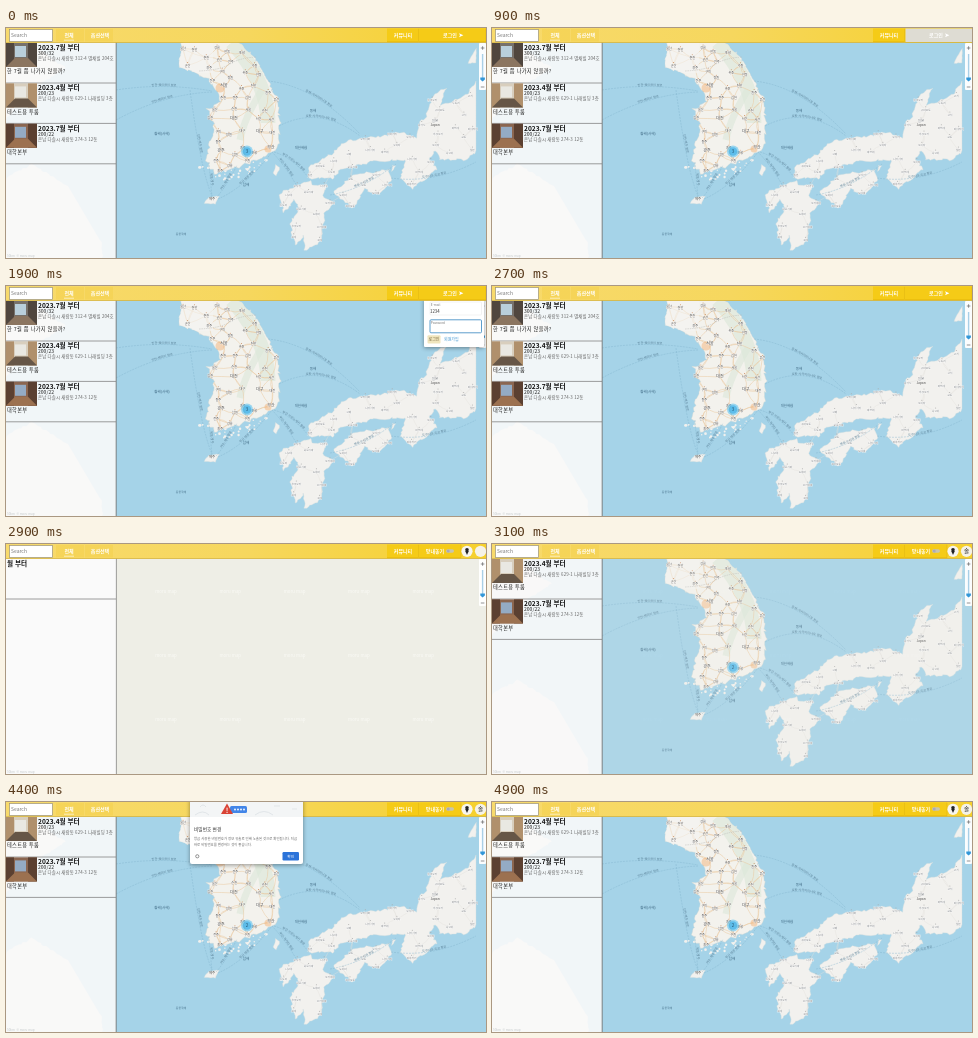
Write an HTML page that moves like this. It is 480x230 px and loops after 5.5 s.

```html
<!DOCTYPE html>
<html lang="ko">
<head>
<meta charset="utf-8">
<title>Room map</title>
<style>
html, body { margin: 0; height: 100%; overflow: hidden; background: #a5d3e8; }
svg { display: block; width: 480px; height: 230px; }
text { font-family: "Noto Sans CJK KR", "Noto Sans CJK", sans-serif; white-space: pre; }
</style>
</head>
<body>
<svg id="stage" viewBox="0 0 480 230"></svg>
<script>
const SEA = '#a5d3e8', LAND = '#f2f1ee';
const clamp = v => Math.max(0, Math.min(1, v));
let seed = 7;
const rand = () => (seed = seed * 16807 % 2147483647) / 2147483647;
const jitter = a => (rand() - .5) * a;

const rect = (x, y, w, h, fill, more = '') =>
  `<rect x="${x}" y="${y}" width="${w}" height="${h}" fill="${fill}" ${more}/>`;
const circle = (x, y, r, fill, more = '') => `<circle cx="${x}" cy="${y}" r="${r}" fill="${fill}" ${more}/>`;
const path = (d, fill, more = '') => `<path d="${d}" fill="${fill}" ${more}/>`;
const line = (d, color, w = 1, more = '') => path(d, 'none', `stroke="${color}" stroke-width="${w}" ${more}`);
const text = (x, y, s, size, fill, more = '') =>
  `<text x="${x}" y="${y}" font-size="${size}" fill="${fill}" ${more}>${s}</text>`;
const mid = (x, y, s, size, fill, more = '') => text(x, y, s, size, fill, 'text-anchor="middle" ' + more);
const group = (id, body) => `<g id="${id}">${body}</g>`;
const BOLD = 'font-weight="700"', SHADOW = 'style="filter:drop-shadow(0 1px 2px #0006)"';

// Turns a few corner points into a rough closed coastline; long straight edges stay straight.
function coast(corners, rough) {
  const p = corners.split(' ').map(q => q.split(',').map(Number));
  const dots = p.flatMap(([x, y], i) => {
    const [u, v] = p[(i + 1) % p.length], edge = Math.hypot(u - x, v - y);
    const n = Math.ceil(edge / 2.5), r = edge > 50 ? 0 : rough;
    return Array.from({ length: n }, (_, k) =>
      `${(x + (u - x) * k / n + jitter(r)).toFixed(1)} ${(y + (v - y) * k / n + jitter(r)).toFixed(1)}`);
  });
  return `M${dots.join('L')}Z`;
}

const korea = coast('176,14 172,38 189,45 202,52 210,62 214,74 201,82 209,98 205,111 201,132 207,145 225,141 236,137 257,130 267,123 274,112 273,76 262,53 249,30 231,14', 3.5);
const honshu = coast('302,150 302,139 327,125 342,112 373,109 395,104 410,109 412,98 420,88 427,67 440,60 435,78 460,67 470,53 470,125 459,132 434,132 430,122 423,131 431,141 407,161 394,150 399,132 369,133 335,142 326,151', 2.5);
const shikoku = coast('327,165 347,147 383,142 385,153 373,167 359,161 347,180 336,172', 2.5);
const kyushu = coast('304,152 291,158 272,166 278,184 289,172 294,180 284,195 289,217 298,207 299,223 314,213 319,185 328,175 317,167 321,157 308,158', 2.5);
const isles = ['198,175 203,169 213,168 209,176', '270,137 274,140 270,148 267,145', '462,35 470,20 470,35', '387,137 390,138 386,143']
  .map(s => coast(s, 1)).join('');
const china = coast('0,14 22,14 45,30 60,40 26,60 0,92', 2) + coast('0,150 26,136 62,158 95,214 97,232 0,232', 2);
let islets = '';
for (let i = 0; i < 34; i++) {
  const a = rand();
  islets += circle(193 + a * 66 + jitter(5), 138 + 13 * Math.sin(a * 3) - a * 8 + jitter(10), .5 + rand(), LAND);
}

// Spreads places over a land shape, at least a gap apart.
const pen = document.createElement('canvas').getContext('2d');
function scatter(shape, gap, [x0, y0, x1, y1], places = []) {
  const land = new Path2D(shape);
  for (let i = 0; i < 900; i++) {
    const x = x0 + rand() * (x1 - x0), y = y0 + rand() * (y1 - y0);
    if (pen.isPointInPath(land, x, y) && places.every(([u, v]) => Math.hypot((x - u) * .8, y - v) > gap)) places.push([x, y]);
  }
  return places;
}
// Joins each place to its nearest neighbours.
const network = (places, links) => places.map(([x, y]) =>
  [...places].sort((a, b) => Math.hypot(a[0] - x, a[1] - y) - Math.hypot(b[0] - x, b[1] - y)).slice(1, links + 1)
    .map(([u, v]) => `M${x} ${y}Q${(x + u) / 2 + jitter(5)} ${(y + v) / 2 + jitter(5)} ${u} ${v}`).join('')).join('');
const labels = (places, names, size, color, dot) => places.map(([x, y], i) =>
  circle(x, y - 3, .5, dot) + mid(x, y + 1, names[i % names.length], size(i), color, 'stroke="#fff" stroke-width=".5" paint-order="stroke"')).join('');

const cities = scatter(korea, 9, [170, 18, 276, 144], [[218, 58], [228, 91], [254, 104], [265, 120], [215, 123]]);
const cityNames = '서울 대전 대구 부산 광주 수원 천안 전주 순천 진주 창원 울산 포항 구미 안동 충주 원주 강릉 춘천 군산 속초 서산 김천 남원'.split(' ');
const towns = scatter(honshu + shikoku + kyushu, 11, [270, 60, 468, 218], [[429, 93]]);
const townNames = '일본 후쿠오카 나가사키 구마모토 오이타 미야자키 히로시마 마쓰에 오카야마 돗토리 고베 교토 오사카 나고야 도야마 나가노 고치'.split(' ');

const ferries = [
  [110, 62, 206, 63, -8, '인천-웨이하이 항로'], [110, 92, 206, 64, -12, '인천-옌타이 항로'],
  [184, 62, 206, 168, 28, '인천-제주 항로'], [203, 134, 206, 168, 4, '목포-제주'],
  [212, 171, 266, 124, 12, '부산-제주 항로'], [210, 170, 231, 137, 5, '여수-제주 항로'],
  [266, 124, 291, 158, -4, '부산-하카타 항로'], [268, 124, 303, 150, -8, '부산-시모노세키 항로'],
  [273, 98, 354, 108, -26, '포항-사카이미나토 항로'], [262, 53, 354, 106, -22, '동해-사카이미나토 항로'],
  [324, 167, 390, 136, 10, '벳푸-오사카 항로'], [385, 150, 470, 134, 14, '도쿠시마-도쿄 항로']
].map(([x, y, u, v, bend, name], i) =>
  `<path id="way${i}" d="M${x} ${y}Q${(x + u) / 2} ${(y + v) / 2 + bend} ${u} ${v}" fill="none" stroke="#7fb0c9" stroke-width=".4" stroke-dasharray="2 1"/>` +
  `<text font-size="3.1" fill="#587f96" text-anchor="middle" dy="-.5"><textPath href="#way${i}" startOffset="50%">${name}</textPath></text>`).join('');

const sea = (x, y, name, size = 3.6) => mid(x, y, name, size, '#47718b');
const mapArt = rect(0, 14, 480, 216, SEA) + path(china, LAND) + islets +
  path(honshu + shikoku + kyushu + isles, LAND, 'stroke="#d5dddd" stroke-width=".4"') +
  path(korea, '#f3f2ed', 'stroke="#d3d9d4" stroke-width=".4"') +
  `<clipPath id="land">${path(korea, '#000')}</clipPath><g clip-path="url(#land)">` +
  line('M226 14Q262 55 262 95', '#dde8da', 15, 'opacity=".65"') + line('M256 62Q238 90 234 112', '#dde8da', 7, 'opacity=".6"') +
  line(network(cities, 3), '#e9c79c', .5) + rect(165, 14, 42, 31, '#f5f5f3', 'opacity=".6"') + '</g>' +
  line('M193 43Q215 42 224 36T250 29', '#b9b9b4', .5, 'stroke-dasharray="1.5 .8"') +
  circle(214, 60, 4.5, '#f3a45f', 'opacity=".4"') + circle(262, 121, 3.5, '#f3a45f', 'opacity=".4"') +
  line(network(towns, 1), '#e2e1dc', .4) + ferries +
  labels(towns, townNames, i => i ? 2.7 : 3.6, '#7b7e80', '#aaa') +
  labels(cities, cityNames, i => i < 5 ? 4 : 3.1, '#45423e', '#c98a5c') + mid(429, 98, 'Japan', 3.2, '#444') +
  mid(206, 172, '제주', 3.4, '#555') + sea(156, 107, '황해(서해)') + sea(307, 84, '동해') +
  sea(295, 121, '대한해협', 3.4) + sea(240, 158, '남해') + sea(175, 207, '동중국해', 2.8) +
  circle(241, 123.5, 6, '#52bdef', 'opacity=".55"') + circle(241, 123.5, 4.3, '#3eb1ea', 'opacity=".65"') +
  mid(241, 125.2, '3', 4.5, '#245776', 'id="count"');

let blank = rect(0, 14, 480, 216, '#eeeee6');
for (let y = 47; y < 230; y += 64.3)
  for (let x = 160; x < 440; x += 64.3) blank += mid(x, y + 1.5, 'moru map', 4.4, '#fafaf6');

const photo = (y, [wall, side, light, floor]) => rect(0, y, 31, 24, wall) + rect(0, y, 8, 24, side) + rect(22, y, 9, 24, side) +
  rect(9, y + 3, 11, 11, light) + path(`M0 ${y + 24}L9 ${y + 15}H22L31 ${y + 24}Z`, floor);
const rooms = [
  ['2023.7월 부터', '300/32', '온남 다솔시 새람동 312-4 별채빌 204호', '한 7월 쯤 나가지 않을까?', ['#77716b', '#50463e', '#b9cfdb', '#8b7560']],
  ['2023.4월 부터', '200/23', '온남 다솔시 새람동 629-1 나래빌딩 3층', '테스트용 투룸', ['#d8cebd', '#b0906c', '#e9e8e2', '#665647']],
  ['2023.7월 부터', '200/22', '온남 다솔시 새람동 274-3 12동', '대학본부', ['#8b6650', '#5b4031', '#94abc4', '#9c7150']]
];
const rule = y => line(`M0 ${y}H110`, '#858585', .8);
const list = ids => ids.map((id, i) => {
  const y = 15 + i * 40.4, [title, price, address, note, tones] = rooms[id];
  return photo(y, tones) + text(32, y + 6.8, title, 6.6, '#111', BOLD) + text(32, y + 11.8, price, 5.05, '#222') +
    text(32, y + 17, address, 4.4, '#666', 'letter-spacing=".1"') +
    text(1, y + 30.2, note, 5.2, '#222', 'letter-spacing=".3"') + rule(y + 40);
}).join('');

const white = (x, s) => mid(x, 8.9, s, 5, '#fff', BOLD);
const button = (x, w) => rect(x, .5, w, 13.5, '#f5cb17') + line(`M${x} 13.7h${w}v-13`, '#e3b508', .6);
const header = '<linearGradient id="gold"><stop stop-color="#f8da6c"/><stop offset=".5" stop-color="#f6d75e"/><stop offset="1" stop-color="#f6d02c"/></linearGradient>' +
  rect(0, 0, 480, 14.5, 'url(#gold)') + rect(0, 14, 480, .8, '#d8b53c') +
  rect(3.5, 1.5, 43, 12, '#fff', 'stroke="#9b9378" stroke-width=".7"') + text(5, 9.3, 'Search', 5, '#777') +
  rect(50, 1, 28, 12.5, '#f6d24f', 'opacity=".6"') + rect(79, 1, 28, 12.5, '#f6d24f', 'opacity=".6"') +
  white(63, '전체') + white(94, '옵션선택') + line('M58 12.2H68', '#fff', .6) +
  button(381, 31.5) + white(397, '커뮤니티') +
  group('guest', button(413, 67) + rect(413.5, .5, 66.5, 13.5, '#dedcd3', 'id="hover"') + white(444, '로그인') +
    path('M453 5.2l4.4 2-4.4 2 1-2z', '#fff')) +
  group('member', button(413, 42) + white(429, '방내놓기') +
    rect(440, 5.2, 8, 3.6, '#c8c5ad', 'rx="1.8"') + circle(442.2, 7, 1.5, '#aaa9b8') +
    circle(461, 7.3, 5.6, '#f7f5ee') + circle(461, 5.8, 1.8, '#222') + path('M459.2 7h3.6l-1.8 4z', '#222') +
    circle(474.5, 7.3, 5.6, '#f5f2e8') + mid(474.5, 9.4, '솔', 5.6, '#222', 'id="initial"'));

const zoom = rect(473, 15, 7, 47, '#fff', 'rx="1" opacity=".95"') + line('M474.8 20h3.6M476.6 18.2v3.6M474.8 59h3.6', '#666', .7) +
  rect(475.9, 26, 1.4, 26, '#a9cfe6') + path('M474.3 49.5h4.6v2l-2.3 2-2.3-2z', '#3397d8');

const field = (id, y, label) => rect(424, y, 51.5, 13, '#fff', `id="${id}Box" rx="1"`) +
  text(424.8, y + 4.3, label, 3.2, '#777') + text(424, y + 10.8, '', 4.3, '#333', `id="${id}"`);
const popup = rect(418, 12, 60, 49, '#fff', 'rx="1" ' + SHADOW) + field('email', 16, 'E-mail') + field('pass', 33.8, 'Password') +
  rect(421.5, 49.3, 13, 8.2, '#f0e5bd', 'id="enter" rx="1"') + mid(428, 54.9, '로그인', 4, '#75653b') +
  text(438, 54.9, '회원가입', 4, '#368fce');

const dialog = rect(184, -4, 113, 66, '#fff', 'rx="2" ' + SHADOW) +
  rect(184, 0, 113, 15, '#f3f5f6') + line('M194 5q3-4 6 0M189 13q8-6 14 0M249 13q9-7 18 0M286 7h5M268 4h6', '#d9dee2', .7) +
  rect(224, 4, 17, 7, '#4285e8', 'rx="1.5"') + [0, 1, 2, 3].map(i => circle(229 + 3 * i, 7.5, .9, '#fff')).join('') +
  path('M221 1.5l6 10.5h-12z', '#d94335') + mid(221, 10.6, '!', 7, '#fff', BOLD) +
  text(188, 29.2, '비밀번호 변경', 4.7, '#333') +
  text(188, 38.2, '방금 사용한 비밀번호가 정보 유출로 인해 노출된 것으로 확인됩니다. 지금', 3.4, '#666') +
  text(188, 43.8, '바로 비밀번호를 변경하는 것이 좋습니다.', 3.4, '#666') +
  circle(191.3, 54.3, 1.6, 'none', 'stroke="#777" stroke-width=".8"') +
  rect(276.5, 50, 16.5, 8.5, '#2b73d9', 'rx="1.2"') + mid(284.7, 55.6, '확인', 3.8, '#fff');

const $ = id => document.getElementById(id);
$('stage').innerHTML = group('blank', blank) + group('map', mapArt) +
  rect(0, 14, 110, 216, '#fafafa', 'opacity=".9"') + rect(109.7, 14, .9, 216, '#777') +
  group('listAll', list([0, 1, 2])) + group('listMine', list([1, 2])) +
  group('loading', rect(0, 14, 109.7, 216, '#fafafa') + text(1, 21.8, '월 부터', 6.6, '#111', BOLD) + rule(55)) +
  text(1, 229.2, '50km  © moru map', 3, '#c3c8ca') +
  zoom + group('popup', popup) + header + group('dialog', dialog);

const fade = (id, v) => { $(id).style.opacity = +v; };
const focus = (id, on) => {
  $(id).setAttribute('stroke', on ? '#4b94c7' : '#ddd');
  $(id).setAttribute('stroke-width', on ? .9 : .4);
};

function draw(t) {
  const ramp = start => clamp((t - start + 100) / 600);
  const member = t >= 2900, ready = t < 2900 || t >= 3000;
  fade('guest', !member);
  fade('member', member);
  fade('initial', t >= 3100);
  fade('hover', ramp(400) - ramp(1000));

  const open = ramp(1000) - ramp(2200);
  fade('popup', open);
  $('popup').setAttribute('transform', `translate(0 ${-4 * (1 - open)})`);
  $('email').textContent = '1234'.slice(0, clamp((t - 1600) / 200) * 4);
  $('pass').textContent = '••••'.slice(0, clamp((t - 1900) / 200) * 4);
  focus('emailBox', t >= 1600 && t < 1900);
  focus('passBox', t >= 1900);
  $('enter').setAttribute('fill', t >= 2100 ? '#e9cb5c' : '#f0e5bd');

  fade('map', member ? 1 - (1 - clamp((t - 2900) / 500)) ** 4 : 1);
  $('count').textContent = member ? 2 : 3;
  fade('listAll', !member);
  fade('listMine', member && ready);
  fade('loading', !ready);

  fade('dialog', t < 3500 ? 0 : t < 4400 ? .85 : clamp((4900 - t) / 500));
  $('dialog').setAttribute('transform', t < 4400 ? 'translate(17 7) scale(.945)' : '');
}

function tick() {
  draw(Math.floor(performance.now() % 5500 / 100) * 100);
  requestAnimationFrame(tick);
}
tick();
</script>
</body>
</html>
```
